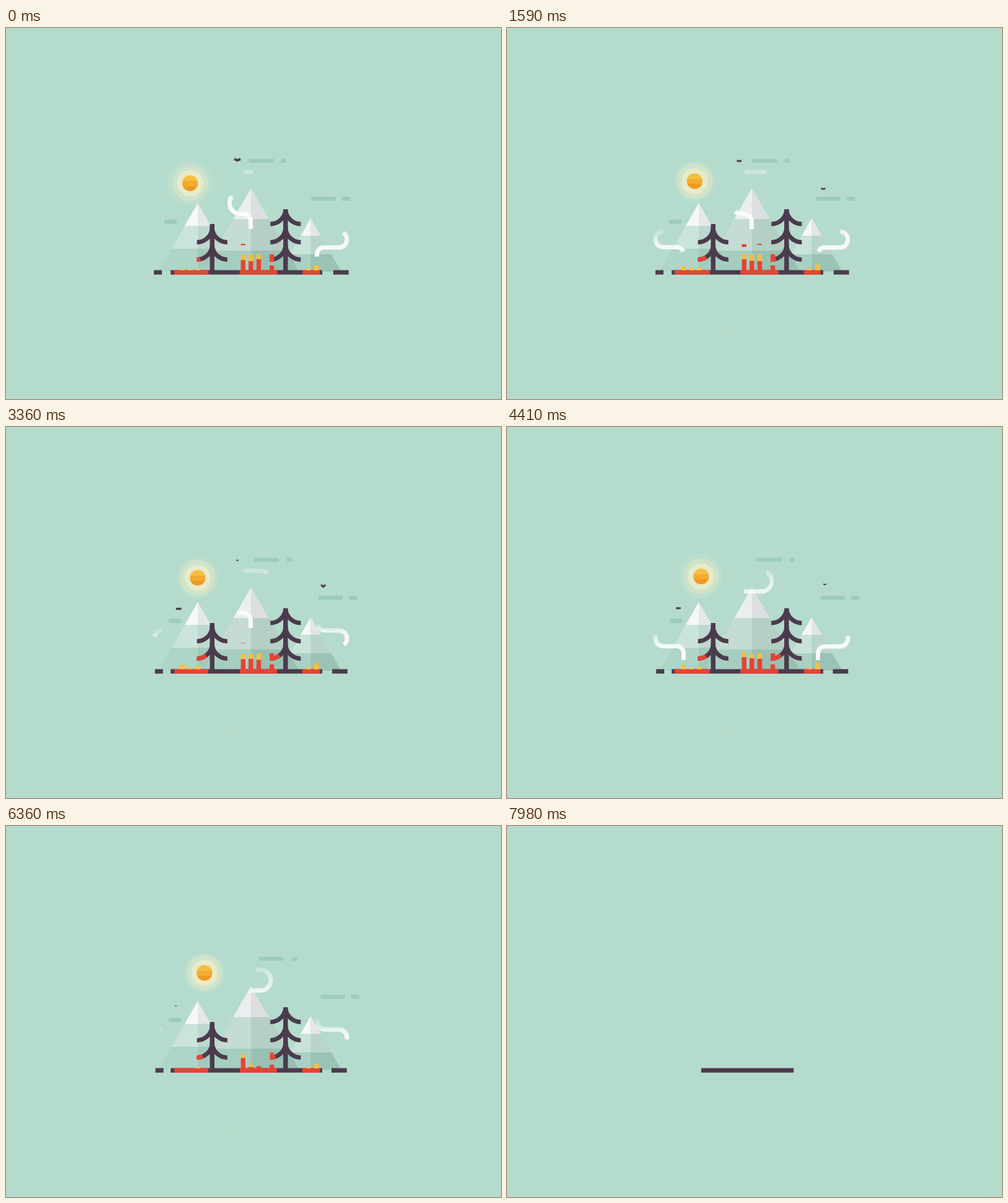
Write an HTML page with a canvas that moves like this. It is 800 px wide and 600 px high and loops after 8 s.

```html
<!DOCTYPE html>
<html lang="en">
<head>
<meta charset="utf-8">
<title>Forest fire</title>
<style>
html, body { margin: 0; width: 100%; height: 100%; overflow: hidden; background: #b5dbcd; }
canvas { display: block; width: 800px; height: 600px; }
</style>
</head>
<body>
<canvas id="stage" width="800" height="600"></canvas>
<script>
const ctx = document.getElementById('stage').getContext('2d');
const LOOP = 8;
const BG = '#b5dbcd', DARK = '#4b3b4d', RED = '#e64335', YELLOW = '#f6bf40', CLOUD = '#9ccdbb';
const TAU = Math.PI * 2;

const clamp = v => Math.min(1, Math.max(0, v));
const progress = (t, a, b) => clamp((t - a) / (b - a));
const backIn = p => p * p * (2.7 * p - 1.7);
const shrink = (t, a, b) => Math.max(0, 1 - backIn(progress(t, a, b)));
const cycle = (t, period) => ((t / period) % 1 + 1) % 1;

// Linear interpolation between values placed at shared times.
const TIMES = [0, 0.81, 2.37, 4.41, 5.67, 7.08, 8];
function at(t, values) {
  let i = 0;
  while (i < values.length - 2 && t > TIMES[i + 1]) i++;
  return values[i] + (values[i + 1] - values[i]) * progress(t, TIMES[i], TIMES[i + 1]);
}

function box(color, x1, y1, x2, y2) {
  if (x2 <= x1 || y2 <= y1) return;
  ctx.fillStyle = color;
  ctx.fillRect(x1, y1, x2 - x1, y2 - y1);
}

function disc(color, x, y, r) {
  ctx.fillStyle = color;
  ctx.beginPath();
  ctx.arc(x, y, r, 0, TAU);
  ctx.fill();
}

function scaled(x, y, s, draw) {
  if (s <= 0) return;
  ctx.save();
  ctx.translate(x, y);
  ctx.scale(s, s);
  ctx.translate(-x, -y);
  draw();
  ctx.restore();
}

function faded(alpha, draw) {
  ctx.save();
  ctx.globalAlpha = alpha;
  draw();
  ctx.restore();
}

function sun(t) {
  const x = 297.5 + 3.66 * t, y = 251 - 2.12 * t;
  scaled(x, y, shrink(t, 7.15, 7.7), () => {
    disc('#bcdecd', x, y, 34 + 2 * Math.cos(TAU * t / 4.7));
    disc('#cee3ca', x, y, 29);
    disc('#e6ebc9', x, y, 21.3);
    ctx.save();
    ctx.beginPath();
    ctx.arc(x, y, 12.7, 0, TAU);
    ctx.clip();
    box('#f7be3e', x - 13, y - 13, x + 13, y - 4);
    box('#f3ac2e', x - 13, y - 4, x + 13, y + 4.3);
    box('#f1981f', x - 13, y + 4.3, x + 13, y + 13);
    ctx.restore();
  });
}

function clouds(t) {
  const a = 392.5 + 2.5 * t, a2 = 444 + 2.9 * t;
  faded(1 - progress(t, 7.2, 7.5), () => box(CLOUD, a, 211.5, a + 40, 218));
  faded(1 - progress(t, 7.35, 7.6), () => box(CLOUD, a2, 211.5, a2 + 8.2, 218));
  const b = 508.5 - 15 * (1 - progress(t, 0, 6)) ** 1.7;
  faded(1 - progress(t, 6.85, 7.12), () => box(CLOUD, b, 273, b + 39, 279.5));
  faded(1 - progress(t, 7.05, 7.28), () => box(CLOUD, b + 49.3, 273, b + 62.5, 279.5));
  const c = 263 - 7 * (1 - progress(t, 0, 3)) ** 2;
  faded(1 - progress(t, 7.3, 7.6), () => box(CLOUD, c, 310, c + 20, 317));
}

function bird(t, x, y, size, phase) {
  if (size <= 0) return;
  const lift = 1 + 2 * Math.sin(TAU * 1.6 * t + phase);
  ctx.save();
  ctx.translate(x, y);
  ctx.scale(size, size);
  ctx.strokeStyle = DARK;
  ctx.lineWidth = 4;
  ctx.beginPath();
  ctx.moveTo(-5, -lift);
  ctx.lineTo(0, lift);
  ctx.lineTo(5, -lift);
  ctx.stroke();
  ctx.restore();
}

function birds(t) {
  bird(t, at(t, [374, 377.5, 373, 375, 375]), at(t, [213, 214, 216, 215, 215]),
    at(t, [1, 0.95, 0.55, 0.15, 0, 0, 0]), 0);
  bird(t, at(t, [509, 510, 512, 513.5, 514.5, 514.5]), at(t, [262, 261, 259, 254.5, 253.5, 253.5]),
    progress(t, 1.4, 1.7) * at(t, [1.2, 1.2, 0.95, 0.45, 0.15, 0, 0]), 0);
  bird(t, at(t, [281, 281, 281, 277, 271.5, 277.5, 277.5]), at(t, [295, 295, 295, 293, 290.5, 291.5, 291.5]),
    progress(t, 3, 3.3) * at(t, [1, 1, 1, 0.75, 0.45, 0.14, 0]), Math.PI);
}

function mountain(t, x, levels, slope, colors, start) {
  const base = levels[3];
  scaled(x, base, shrink(t, start, start + 0.6), () => {
    for (let i = 0; i < 3; i++) {
      const y1 = levels[i], y2 = levels[i + 1];
      const w1 = (y1 - levels[0]) * slope, w2 = (y2 - levels[0]) * slope;
      [-1, 1].forEach((side, j) => {
        ctx.fillStyle = colors[i][j];
        ctx.beginPath();
        ctx.moveTo(x, y1);
        ctx.lineTo(x + side * w1, y1);
        ctx.lineTo(x + side * w2, y2);
        ctx.lineTo(x, y2);
        ctx.fill();
      });
    }
  });
}

function mountains(t) {
  mountain(t, 310, [283, 320, 357, 394], 0.57,
    [['#f6f7f7', '#e5e8e8'], ['#cbe4db', '#bfd8cf'], ['#aed5c7', '#a2cabc']], 7.2);
  mountain(t, 492.5, [307.5, 336, 366, 394], 0.57,
    [['#f6f7f7', '#e3e6e6'], ['#c9e3da', '#b9d5cb'], ['#a9d1c3', '#9ac3b5']], 7.15);
  mountain(t, 396, [259, 309, 360, 394], 0.575,
    [['#ebeeef', '#dcdfe1'], ['#c4dcd3', '#b5cfc5'], ['#a5cec1', '#99c0b3']], 7.25);
}

// Branches are quarter circles; the lowest left one burns from its tip.
function tree(t, x, top, rows, burn) {
  const R = 24.6;
  scaled(x, 392, shrink(t, 6.94, 7.64), () => {
    box(DARK, x - 3.75, top, x + 3.75, 393);
    ctx.save();
    ctx.beginPath();
    ctx.rect(x - 40, top, 80, 100);
    ctx.clip();
    ctx.lineWidth = 7;
    ctx.strokeStyle = DARK;
    const arc = (cx, y, a, b) => {
      ctx.beginPath();
      ctx.arc(cx, y - R, R, a, b);
      ctx.stroke();
    };
    for (const y of rows) {
      arc(x - R, y, 0, Math.PI / 2);
      arc(x + R, y, Math.PI / 2, Math.PI);
    }
    if (burn > 0.3) {
      ctx.strokeStyle = RED;
      arc(x - R - 0.4, rows[rows.length - 1], Math.PI / 2 - burn / R, Math.PI / 2);
    }
    ctx.restore();
  });
}

function flame(x, top, tip) {
  const split = Math.min(392, top + tip);
  box(YELLOW, x, top, x + 7.4, split);
  box(RED, x, split, x + 7.4, 392);
}

// A spark rises above a flame and is trimmed away at its top.
function spark(x, t, end) {
  const bottom = 349 + 40 * 0.83 * (1 - cycle(t - end, 0.83));
  if (bottom < 359.5) box(RED, x, Math.max(349, bottom - 2.5 - (bottom - 349) * 0.4), x + 7.4, bottom);
}

function fire(t) {
  const die = 1 - progress(t, 6.2, 6.8);
  const height = top => 392 - (392 - top) * die;
  const flicker = Math.cos(TAU * cycle(t - 0.06, 0.83));
  if (die > 0) {
    flame(379.5, height(363.5 + 3.5 * flicker), 8.5 * die);
    flame(392, height(at(t, [366, 366, 366, 368, 375, 392])), at(t, [11, 11, 10, 6, 8, 0]));
    flame(404.8, height(at(t, [366, 366, 366, 366, 383, 392])), at(t, [8, 10, 12, 9, 0, 0]));
    box(RED, 426, height(384), 433.2, 392);
    faded(die, () => box(RED, 426, 366, 433.2, 378));
    if (t < 6) spark(379.5, t, 0.06);
    if (t < 5.2) spark(404.6, t, 0.81);

    const small = [
      [281.5, [390, 387.5, 383.5, 385, 392, 392]],
      [294, [390.5, 388.5, 387.5, 390.5, 392, 392]],
      [306.5, [390, 388, 386, 387, 386, 392]],
      [485, [389, 388.5, 388, 389, 388, 390]],
      [498, [384, 381, 383, 381, 381, 384]]
    ];
    for (const [x, tops] of small) box(YELLOW, x, height(at(t, tops)), x + 7.6, 392);
  }
}

function strip(color, center, half) {
  box(color, center - half, 391.6, center + half, 398.8);
}

function ground(t) {
  const edge = 2.6 * (1 - (1 - progress(t, 0, 7)) ** 1.6);
  const q = progress(t, 7.6, 8.21);
  strip(DARK, 388.6, 122.5 * (1 - q * q));
  strip(DARK, 245.5 + edge, 6.5 * shrink(t, 7.3, 7.75));
  strip(DARK, 541.4 - edge * 1.15, 12.4 * shrink(t, 7.25, 7.7));
  const sway = 0.6 * Math.sin(TAU * t / 1.3);
  strip(RED, 299.5, (27.8 + sway) * (1 - progress(t, 6.75, 7.2)));
  strip(RED, 408, (30.4 + sway) * shrink(t, 7.05, 7.5));
  strip(RED, 493.2, (14 - sway) * shrink(t, 7.05, 7.5));
}

function fade(stops, y1, y2) {
  const g = ctx.createLinearGradient(0, y1, 0, y2);
  stops.forEach(([pos, alpha]) => g.addColorStop(pos, `rgba(250,251,250,${alpha})`));
  return g;
}

const smokes = {
  middle: {
    path: new Path2D('M395.5 325V313A12.5 12.5 0 0 0 383 300.5H378.5A17.2 17.2 0 0 1 378.5 266H412.5A16.8 16.8 0 0 0 412.5 232.5H384'),
    length: 206,
    paint: fade([[0, 0.3], [0.12, 0.55], [0.4, 0.85], [0.7, 0.96], [1, 1]], 231, 325),
    starts: [-2.44, -0.62, 1.2, 3.02, 4.84],
    head: age => 120 * age,
    tail: age => age < 1.43 ? 122 * (age - 0.62) : 99 + 87 * (age - 1.43)
  },
  left: {
    path: new Path2D('M285.5 377V365.5A11 11 0 0 0 274.5 354.5H252.8A13 13 0 0 1 252.8 328.5'),
    length: 91,
    paint: fade([[0, 0.25], [0.3, 0.6], [0.6, 0.92], [1, 1]], 328, 372),
    starts: [0.66, 1.95, 3.65, 4.83],
    head: age => 100 * age,
    tail: age => 120 * (age - 0.8)
  },
  right: {
    path: new Path2D('M502.5 377V366A11 11 0 0 1 513.5 355H538A13 13 0 0 0 538 329H515A11.5 11.5 0 0 1 515 306H525'),
    length: 163,
    paint: fade([[0, 0.2], [0.25, 0.35], [0.4, 0.85], [0.65, 0.96], [1, 1]], 304, 372),
    starts: [-0.86, 0.66, 2.05, 3.64, 4.98, 6.56],
    head: age => 100 * age,
    tail: age => 120 * (age - 0.8)
  }
};

function smoke(t, { path, length, paint, starts, head, tail }) {
  ctx.save();
  ctx.strokeStyle = paint;
  ctx.lineWidth = 7;
  ctx.globalAlpha = (1 - 0.4 * progress(t, 6.4, 7)) * (1 - progress(t, 7.1, 7.6));
  for (const start of starts) {
    const age = t - start;
    const from = Math.max(0, tail(age)), to = Math.min(length + 2, head(age));
    if (age <= 0 || to - from < 0.2) continue;
    ctx.setLineDash([to - from, 999]);
    ctx.lineDashOffset = -from;
    ctx.stroke(path);
  }
  ctx.restore();
}

function draw(t) {
  box(BG, 0, 0, 800, 600);
  sun(t);
  clouds(t);
  mountains(t);
  birds(t);
  ground(t);
  tree(t, 333.2, 317, [346.5, 374.5], at(t, [6, 10, 18, 14, 14, 7, 0]));
  tree(t, 451.8, 293.5, [317, 346.5, 374.5], at(t, [0, 0, 15, 17, 17, 0, 0]));
  fire(t);
  Object.values(smokes).forEach(s => smoke(t, s));
  const ember = at(t, [0.25, 0.5, 0.8, 0.8, 0.5, 0, 0]);
  faded(ember, () => box('#e3c36a', 356.3, 488.7, 358.8, 491.2));
}

const begin = performance.now();
function frame() {
  draw(((performance.now() - begin) / 1000) % LOOP);
  requestAnimationFrame(frame);
}
frame();
</script>
</body>
</html>
```
